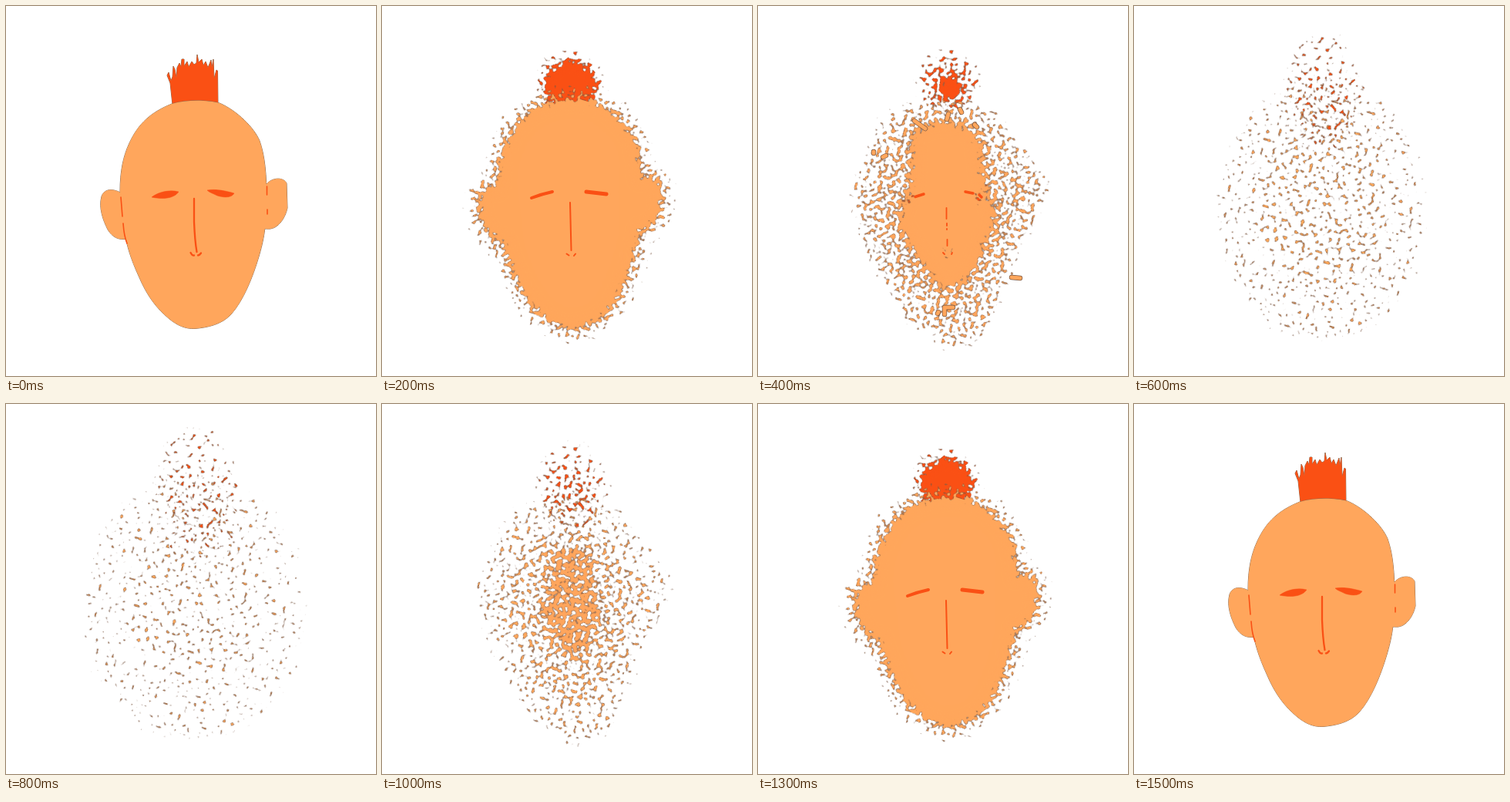
Animation, 480 px wide and 480 px high, one loop 1600 ms. Source, as an HTML page without scripts:

```html
<!DOCTYPE html>
<html lang="en">
<head>
<meta charset="utf-8">
<title>Scattering head</title>
<style>
  html, body { margin: 0; width: 100%; height: 100%; overflow: hidden; background: #fff; }
  svg { display: block; width: 100%; height: 100%; --f: 0; animation: scatter 1.6s step-end infinite; }

  /* Scatter out to pose 7, then gather back in reverse. */
  @keyframes scatter {
    0%, 93.75%, 100% { --f: 0; }
    6.25%, 87.5% { --f: 1; }
    12.5%, 81.25% { --f: 2; }
    18.75%, 75% { --f: 3; }
    25%, 68.75% { --f: 4; }
    31.25%, 62.5% { --f: 5; }
    37.5%, 56.25% { --f: 6; }
    43.75%, 50% { --f: 7; }
  }
  .pose { opacity: calc(1 - max(var(--f) - var(--i), var(--i) - var(--f))); }

  .skin { fill: #ffa65c; stroke: #ffa65c; --turn: 17deg; }
  .red { fill: #fa5014; stroke: #fa5014; --turn: 50deg; }
  .line { fill: none; stroke: #fa5014; stroke-linecap: round; stroke-linejoin: round; }
  .edge { stroke: #8a6a50; stroke-width: 1; paint-order: stroke; }
  .soft { stroke: none; }

  /* The grain turns and spreads outwards with each pose; the shapes inside stay put. */
  .grain { filter: url(#grain); --s: calc(1 + .015 * var(--i)); }
  .grain, .grain > g { transform-origin: 247px 125px; }
  .grain { transform: rotate(var(--turn)) scale(var(--s)); }
  .grain > g { transform: scale(calc(1 / var(--s))) rotate(calc(-1 * var(--turn))); }
</style>
</head>
<body>
<svg viewBox="0 0 480 480">
  <defs>
    <!-- Opacity becomes grain density: soft shape + noise, cut at a threshold. -->
    <filter id="grain" filterUnits="userSpaceOnUse" x="-50" y="-50" width="580" height="580" color-interpolation-filters="sRGB">
      <feTurbulence type="fractalNoise" baseFrequency=".21" numOctaves="1" seed="7" result="noise"/>
      <feGaussianBlur in="SourceGraphic" stdDeviation="6" result="soft"/>
      <feComposite in="soft" in2="noise" operator="arithmetic" k2=".7" k3=".8" result="sum"/>
      <feComponentTransfer in="sum" result="rim"><feFuncA type="linear" slope="16" intercept="-10.54"/></feComponentTransfer>
      <feComponentTransfer in="sum" result="dot"><feFuncA type="linear" slope="16" intercept="-11.18"/></feComponentTransfer>
      <feComponentTransfer in="soft" result="paint"><feFuncA type="linear" slope="99" intercept="-5"/></feComponentTransfer>
      <feComposite in="paint" in2="dot" operator="in" result="body"/>
      <feFlood flood-color="#75533f"/>
      <feComposite in2="rim" operator="in"/>
      <feComposite in2="paint" operator="in" result="outline"/>
      <feMerge><feMergeNode in="outline"/><feMergeNode in="body"/></feMerge>
    </filter>

    <path id="head" d="M148 240C148 215 152 195 160 178C172 152 188 138 215 127C235 121 262 122 277 126C300 136 322 158 329 175C336 195 338 220 338 250C338 285 334 305 328 325C320 352 308 382 292 400C280 413 262 417 245 418.5C232 419 222 414 212 406C195 392 183 376 172 350C162 328 157 312 153 290C149 270 148 255 148 240Z
      M157 302C146 304 138 300 132 290C126 278 120 262 124 247C128 236 140 237 150 243Z
      M334 232L338 231C346 222 360 222 364 230L365 262C362 276 352 291 338 289L334 289Z"/>
    <path id="hair" d="M216 128L213 100 209 90 211 86 214 97 216 92 217 78 219 82 221 93 222 80 225 74 227 79 228 69 231 69 231 78 235 72 237 79 241 72 244 76 247 74 248 63 250 73 254 69 256 77 259 72 262 80 266 70 267 80 269 69 270 94 273 83 274.5 84 275 127Z"/>
    <path id="core" d="M205 170C215 158 240 152 265 160C285 168 284 190 286 215C290 250 303 255 302 280C298 295 288 300 285 315C275 340 260 362 250 362C235 360 222 340 212 322C205 305 190 295 188 275C190 255 205 245 204 220Z"/>
    <path id="cloud" d="M250 108L310 140 384 228 336 335 292 438 240 444 186 405 132 305 118 240 165 137Z"/>
    <path id="chunks" d="M203 149l14 10M329 352l11 1M150 189v2M162 196l4-2M247 140l-2 7M262 134l2 4M281 154l3 3M233 399l1-2M242 400v-9h11"/>
    <g id="features">
      <g class="red" stroke-width=".5">
        <path d="M189 248C198 241 212 238 224 241C218 250 203 251 189 248Z"/>
        <path d="M261 239C272 237 286 240 296 243C292 250 280 248 274 246C268 243 264 242 261 239Z"/>
      </g>
      <path class="line" stroke-width="2.3" d="M244 250V280Q245 305 247.5 319M239.5 320q2 4 4.5 3.5M253 320.5q-2 3-4 3"/>
      <path class="line" stroke-width="1.6" d="M149 248L151 273M152 282Q153 298 157 308M338.5 234V245M339 264V270"/>
    </g>
    <g id="squint" class="line">
      <path stroke-width="4" d="M194 249Q207 244 221 241"/>
      <path stroke-width="5" d="M265 241L291 244"/>
      <path stroke-width="2" d="M244 255L245.5 317M239.5 321.5l3 2M251 321.5l-2 2.5"/>
    </g>
  </defs>

  <g class="pose" style="--i:0">
    <g class="red"><use href="#hair" class="edge"/></g>
    <g class="skin"><use href="#head" class="edge"/></g>
    <use href="#features"/>
  </g>

  <g class="pose" style="--i:1">
    <g class="red grain"><g><use href="#hair" stroke-width="16" stroke-opacity=".25"/></g></g>
    <g class="skin grain"><g><use href="#head" stroke-width="18" stroke-opacity=".25"/></g></g>
    <use href="#features"/>
  </g>

  <g class="pose" style="--i:2">
    <g class="red grain"><g class="soft">
      <ellipse cx="244" cy="98" rx="45" ry="44" opacity=".27"/>
      <ellipse cx="244" cy="104" rx="31" ry="29"/>
    </g></g>
    <g class="skin grain"><g><use href="#head" transform="translate(12 4) scale(.95 .98)" stroke-width="46" stroke-opacity=".29"/></g></g>
    <use href="#squint"/>
  </g>

  <g class="pose" style="--i:3">
    <g class="red grain"><g class="soft">
      <ellipse cx="246" cy="98" rx="44" ry="43" opacity=".31"/>
      <ellipse cx="246" cy="105" rx="20" ry="19"/>
    </g></g>
    <g class="skin grain"><g>
      <use href="#head" transform="translate(54 33) scale(.78 .86)" stroke-width="90" stroke-opacity=".26"/>
      <use href="#head" transform="translate(54 33) scale(.78 .86)" stroke-width="44" stroke-opacity=".12"/>
    </g></g>
    <use href="#squint"/>
  </g>

  <g class="pose" style="--i:4">
    <g class="skin grain"><g>
      <use href="#cloud" class="soft" opacity=".31"/>
      <use href="#cloud" class="soft" opacity=".08" transform="translate(50 56) scale(.8)"/>
      <use href="#core" stroke-width="26" stroke-opacity=".12"/>
    </g></g>
    <g class="red grain"><g class="soft">
      <ellipse cx="247" cy="96" rx="43" ry="42" opacity=".3"/>
      <ellipse cx="248" cy="102" rx="24" ry="24" opacity=".15"/>
      <ellipse cx="248" cy="107" rx="10" ry="11"/>
      <g opacity=".4">
        <circle cx="192" cy="251" r="13"/>
        <circle cx="288" cy="245" r="13"/>
        <ellipse cx="247" cy="321" rx="11" ry="7"/>
      </g>
    </g></g>
    <g fill="none" stroke-linecap="round" stroke-linejoin="round">
      <use href="#chunks" stroke="#75533f" stroke-width="6.4"/>
      <use href="#chunks" stroke="#ffa65c" stroke-width="5"/>
    </g>
    <g class="line">
      <path stroke-width="3.5" d="M204 247.5L215 244M269 241L279 243M287 245l3 3"/>
      <path stroke-width="1.8" d="M244.5 262V276M245 282v3M245 289v1M245.5 303V311M240 320l2 2M252 320l-1 2"/>
    </g>
  </g>

  <g class="pose" style="--i:5">
    <g class="skin grain"><g class="soft">
      <use href="#cloud" opacity=".25"/>
      <use href="#cloud" opacity=".1" transform="translate(75 82) scale(.7)"/>
      <use href="#core" opacity=".3" transform="translate(74 78) scale(.7)"/>
    </g></g>
    <g class="red grain"><g class="soft">
      <ellipse cx="246" cy="108" rx="48" ry="60" opacity=".25"/>
      <ellipse cx="247" cy="112" rx="24" ry="28" opacity=".1"/>
      <ellipse cx="245" cy="250" rx="65" ry="25" opacity=".14"/>
    </g></g>
  </g>

  <g class="pose" style="--i:6">
    <g class="skin grain"><g class="soft">
      <ellipse cx="244" cy="264" rx="138" ry="174" opacity=".2"/>
      <ellipse cx="246" cy="250" rx="85" ry="115" opacity=".07"/>
    </g></g>
    <g class="red grain"><g class="soft">
      <ellipse cx="245" cy="114" rx="54" ry="80" opacity=".21"/>
      <ellipse cx="246" cy="125" rx="32" ry="44" opacity=".06"/>
    </g></g>
  </g>

  <g class="pose" style="--i:7">
    <g class="skin grain"><g class="soft">
      <ellipse cx="244" cy="264" rx="148" ry="176" opacity=".18"/>
      <ellipse cx="248" cy="245" rx="88" ry="115" opacity=".045"/>
    </g></g>
    <g class="red grain"><g class="soft">
      <ellipse cx="247" cy="118" rx="60" ry="94" opacity=".19"/>
      <ellipse cx="252" cy="125" rx="38" ry="60" opacity=".05"/>
    </g></g>
  </g>
</svg>
</body>
</html>
```
